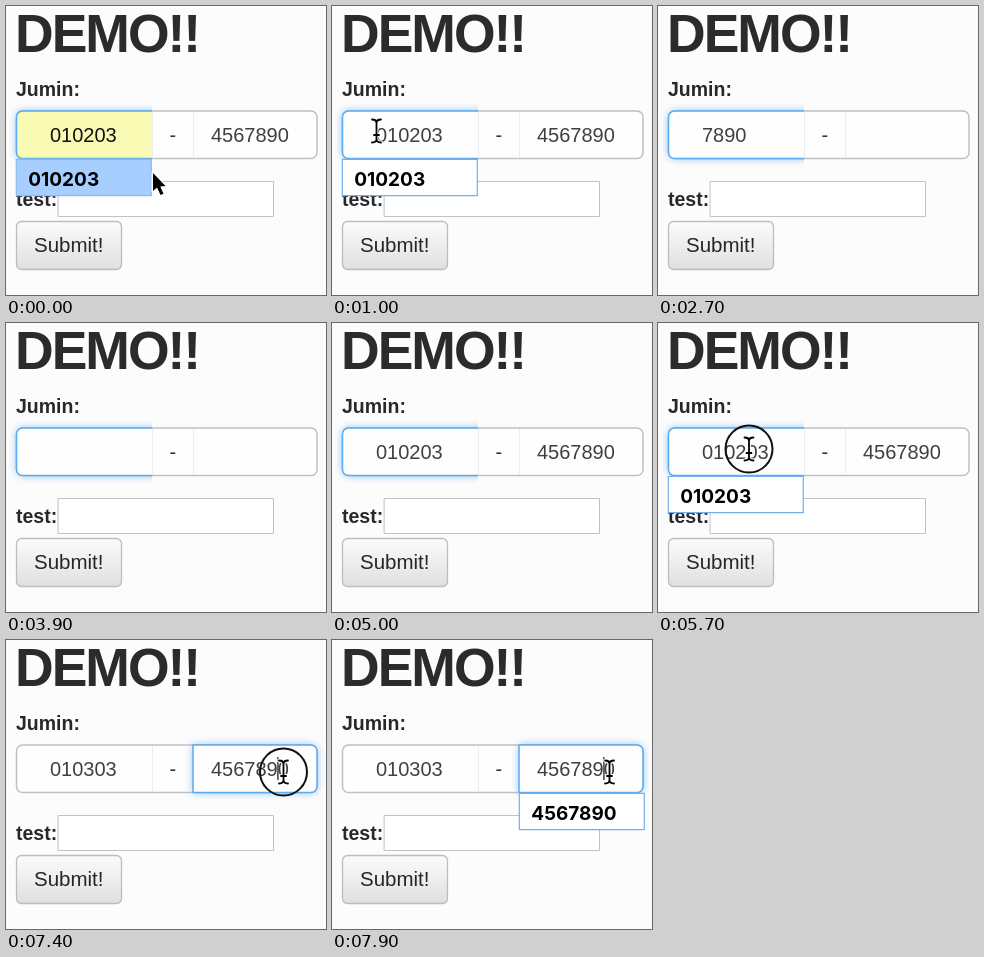
Recreate the animation shown at these times as an HTML page with a canvas. Size 320 by 289 pixels, loop 8000 ms.

```html
<!DOCTYPE html>
<html lang="en">
<head>
<meta charset="utf-8">
<title>Demo form</title>
<style>
  html, body { margin: 0; width: 100%; height: 100%; overflow: hidden; background: #fdfcfd; }
  canvas { display: block; width: 320px; height: 289px; }
</style>
</head>
<body>
<canvas id="stage" width="320" height="289"></canvas>
<script>
const ctx = document.getElementById('stage').getContext('2d');
const LOOP = 8000;
const SANS = '"Liberation Sans", Arial, sans-serif';
const MENU = 'Inter, sans-serif';
const FULL = '0102034567890';
const DIGIT = 11.12;
const LEFT = 44, RIGHT = 205;

// Times at which one leading digit is removed
const cuts = [1200, 1400, 1600, 1800, 2000, 2200, 2400, 2500, 2700, 2900, 3100, 3300, 3500];

// Pointer path: time, x, y
const path = [
  [0, 146.5, 165], [100, 139, 157], [200, 122, 132], [300, 105, 126],
  [400, 105, 126], [500, 44.5, 125], [5200, 44.5, 125], [5500, 91, 126],
  [6700, 91, 126], [6800, 123.5, 124], [7200, 277.5, 132], [8000, 277.5, 132]
];

const within = (t, a, b) => t >= a && t < b;

function value(t) {
  if (t < 4300) return FULL.slice(cuts.filter(c => c <= t).length);
  if (within(t, 6200, 6500)) return '010034567890';
  return t < 6200 ? FULL : '0103034567890';
}

function pointer(t) {
  let i = 0;
  while (i < path.length - 2 && path[i + 1][0] <= t) i++;
  const [t0, x0, y0] = path[i], [t1, x1, y1] = path[i + 1];
  const k = (t - t0) / (t1 - t0);
  return [x0 + (x1 - x0) * k, y0 + (y1 - y0) * k];
}

function caret(t) {
  if (within(t, 1200, 3500)) {
    const last = cuts.filter(c => c <= t).pop();
    return t - last >= 100 ? LEFT + 0.5 : null;
  }
  if (within(t, 3500, 3900)) return LEFT + 0.5;
  if (within(t, 4400, 4900)) return LEFT + 6 * DIGIT;
  if (within(t, 5900, 6200)) return LEFT + 4 * DIGIT + 1;
  if (within(t, 6200, 6500)) return LEFT + 3 * DIGIT + 1;
  if (within(t, 6500, 7100)) return LEFT + 4 * DIGIT + 1;
  if (within(t, 7300, 7600) || t >= 7900) return RIGHT + 6 * DIGIT;
  return null;
}

function text(str, x, y, font, color, spacing = 0) {
  ctx.font = font;
  ctx.fillStyle = color;
  ctx.letterSpacing = spacing + 'px';
  ctx.fillText(str, x, y);
}

function box(x, y, w, h, r, fill, stroke, line = 1) {
  ctx.beginPath();
  ctx.roundRect(x, y, w, h, r);
  if (fill) { ctx.fillStyle = fill; ctx.fill(); }
  if (stroke) { ctx.strokeStyle = stroke; ctx.lineWidth = line; ctx.stroke(); }
}

function rule(x) {
  ctx.fillStyle = '#ececee';
  ctx.fillRect(x, 106, 1, 46);
}

// The glow lies outside the field, the fill covers its inner half
function focusRing(second, fill) {
  const shape = second ? [187, 105, 124, 47.5, [0, 6, 6, 0]] : [10.5, 105, 150, 47.5, [6, 0, 0, 6]];
  ctx.save();
  ctx.beginPath();
  ctx.rect(second ? 178 : 0, 95, second ? 142 : 146, 70);
  ctx.clip();
  ctx.shadowColor = 'rgba(82,168,236,0.7)';
  ctx.shadowBlur = 9;
  box(...shape, fill);
  ctx.shadowColor = 'transparent';
  box(...shape, null, '#5caaf0', 1.5);
  ctx.restore();
}

function menu(x, w, str, active) {
  box(x + 0.3, 153.4, w, 36.2, 0, active ? '#a6cfff' : '#fff', active ? '#8bbcf0' : '#74afe9', 1.2);
  text(str, x + 12.3, 180, 'bold 19px ' + MENU, '#000');
}

function outlined(width) {
  ctx.lineJoin = ctx.lineCap = 'round';
  ctx.strokeStyle = '#fff';
  ctx.lineWidth = width + 2;
  ctx.stroke();
  ctx.strokeStyle = '#000';
  ctx.lineWidth = width;
}

function arrow(x, y) {
  ctx.beginPath();
  [[0.5, 2], [0.5, 20], [4.5, 16.5], [8, 24], [11, 22.8], [7.8, 15.5], [13, 15]]
    .forEach(([dx, dy]) => ctx.lineTo(x + dx, y + dy));
  ctx.closePath();
  outlined(1);
  ctx.fillStyle = '#000';
  ctx.fill();
}

function beam(x, y) {
  ctx.beginPath();
  for (const s of [-1, 1]) {
    ctx.moveTo(x - 4.5, y + 11.5 * s);
    ctx.quadraticCurveTo(x, y + 11.5 * s, x, y + 8 * s);
    ctx.quadraticCurveTo(x, y + 11.5 * s, x + 4.5, y + 11.5 * s);
  }
  ctx.moveTo(x, y - 9);
  ctx.lineTo(x, y + 9);
  ctx.moveTo(x - 2.5, y + 4);
  ctx.lineTo(x + 2.5, y + 4);
  outlined(1.8);
  ctx.stroke();
}

function form(t) {
  const filled = t < 1000;
  const second = t >= 7300;
  const str = value(t);

  text('DEMO!!', 9, 46, 'bold 53.5px ' + SANS, '#2b2a2d', -2);
  text('Jumin:', 10, 90, 'bold 19.5px ' + SANS, '#28272a');
  text('test:', 10, 200, 'bold 19.5px ' + SANS, '#28272a');
  box(52.5, 175.5, 215, 35, 0, '#fff', '#c2c2c4');

  const shade = ctx.createLinearGradient(0, 215, 0, 264);
  shade.addColorStop(0, '#fcfcfd');
  shade.addColorStop(1, '#dfdee0');
  box(10.5, 215.5, 105, 48, 5, shade, '#bdbdbf', 1.3);
  text('Submit!', 28, 246, '20.5px ' + SANS, '#262628');

  box(10.5, 105, 300.5, 47.5, 6, '#fefefe', '#c0c0c4', 1.5);
  rule(146);
  rule(187);
  focusRing(second, filled ? '#f9fbb4' : '#fefefe');

  const font = '20px ' + SANS;
  text(str.slice(0, 6), LEFT, 136, font, filled ? '#111' : '#404043');
  text('-', 163.5, 136, font, '#333');
  text(str.slice(6), RIGHT, 136, font, '#404043');

  const at = caret(t);
  if (at !== null) {
    ctx.fillStyle = '#333';
    ctx.fillRect(at - 0.5, 117, 1.4, 23);
  }

  if (t < 200) menu(10, 135, '010203', true);
  else if (within(t, 1000, 1300) || within(t, 5600, 6300)) menu(10, 135, '010203');
  else if (t >= 7600) menu(187, 125, '4567890');
}

function mouse(t) {
  if (within(t, 1200, 5200) || within(t, 6200, 6800)) return;
  const [x, y] = pointer(t);
  if (t < 200) arrow(x, y);
  else beam(x, y);
  if (within(t, 500, 600) || within(t, 5600, 5800) || within(t, 7300, 7500)) {
    ctx.beginPath();
    ctx.arc(x, y, 23.5, 0, Math.PI * 2);
    ctx.strokeStyle = '#111';
    ctx.lineWidth = 2;
    ctx.stroke();
  }
}

function draw(now) {
  // The picture advances in steps of 100 ms
  const t = Math.floor((now % LOOP) / 100) * 100;
  ctx.fillStyle = '#fdfcfd';
  ctx.fillRect(0, 0, 320, 289);
  form(t);
  mouse(t);
}

const start = performance.now();
function tick() {
  draw(performance.now() - start);
  requestAnimationFrame(tick);
}
tick();
</script>
</body>
</html>
```
